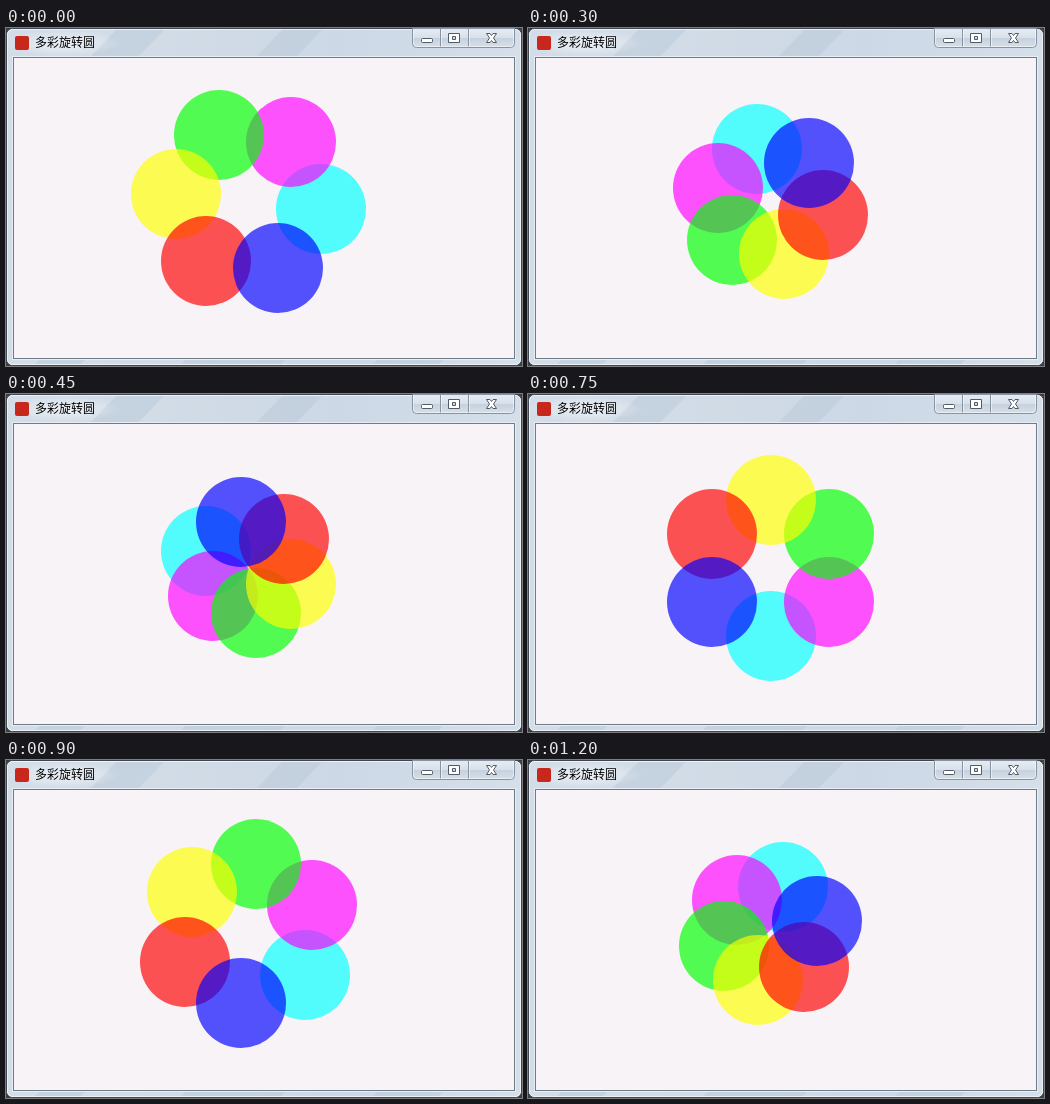
These frames come from a looping animation (516 by 338 pixels, 1350 ms). An HTML page:

```html
<!DOCTYPE html>
<html lang="zh-CN">
<head>
<meta charset="utf-8">
<title>多彩旋转圆</title>
<style>
  html, body { margin: 0; width: 100%; height: 100%; overflow: hidden; background: #3b3f44; }
  svg { display: block; }
</style>
</head>
<body>
<svg width="516" height="338" viewBox="0 0 516 338">
  <defs>
    <linearGradient id="frame" x1="0" y1="0" x2="1" y2="0">
      <stop offset="0" stop-color="#d3dde8"/>
      <stop offset=".3" stop-color="#d2dce7"/>
      <stop offset=".65" stop-color="#ccd8e6"/>
      <stop offset="1" stop-color="#d5dfea"/>
    </linearGradient>
    <linearGradient id="button" x1="0" y1="0" x2="0" y2="1">
      <stop offset="0" stop-color="#e6ecf3"/>
      <stop offset=".48" stop-color="#d8e1eb"/>
      <stop offset=".5" stop-color="#c6d1de"/>
      <stop offset="1" stop-color="#d6e0ea"/>
    </linearGradient>
    <radialGradient id="glow">
      <stop offset="0" stop-color="#fff" stop-opacity=".6"/>
      <stop offset="1" stop-color="#fff" stop-opacity="0"/>
    </radialGradient>
  </defs>

  <!-- Window frame -->
  <rect x=".5" y=".5" width="515" height="337" rx="6" fill="url(#frame)" stroke="#3f464e"/>
  <g fill="#bccad9" opacity=".55">
    <path d="M110 2h48l-26 27h-48zM276 2h40l-26 27h-40z"/>
    <path d="M34 331h46l-5 5H29zM180 331h100l-5 5H175zM372 331h66l-5 5h-66z"/>
  </g>
  <ellipse cx="58" cy="15" rx="58" ry="13" fill="url(#glow)"/>
  <rect x="1.5" y="1.5" width="513" height="335" rx="5" fill="none" stroke="#f3f7fb" stroke-opacity=".85"/>
  <rect x="6.5" y="28.5" width="503" height="303" fill="none" stroke="#e7eef5"/>
  <rect x="7.5" y="29.5" width="501" height="301" fill="#f7f3f7" stroke="#6f7b87"/>

  <!-- Title -->
  <rect x="9" y="8" width="14" height="14" rx="2" fill="#c8281c"/>
  <text x="29" y="19" font-size="12" fill="#000"
        font-family="'Noto Sans CJK SC', 'Noto Sans CJK', sans-serif">多彩旋转圆</text>

  <!-- Window buttons -->
  <path d="M406.5 .5V15.500q0 4 4 4H504.500q4 0 4-4V.5z" fill="url(#button)" stroke="#8793a1"/>
  <path d="M434.500 1V19M462.500 1V19" stroke="#8793a1"/>
  <path d="M407.500 1V15.500q0 3 3 3H504.500q3 0 3-3V1M435.500 1V18M463.500 1V18"
        fill="none" stroke="#fff" stroke-opacity=".5"/>
  <g fill="#fff" stroke="#535b68">
    <rect x="415.500" y="10.500" width="11" height="4" rx="1"/>
    <path fill-rule="evenodd" d="M442.500 5.500h11v9h-11zM446.500 8.500h3v3h-3z"/>
    <path d="M480.500 5.500h3.500l1.500 2 1.500-2h3.500l-3 4.500 3 4.500h-3.500l-1.500-2-1.500 2h-3.500l3-4.500z"/>
  </g>

  <g id="ring" fill-opacity=".667"></g>
</svg>
<script>
  const LOOP = 1350, STEP = 150;
  const CENTER = { x: 243, y: 174 };
  const NEAR = 45, FAR = 74;
  const COLORS = ['#0ff', '#f0f', '#0f0', '#ff0', '#f00', '#00f'];

  const ring = document.getElementById('ring');
  const circles = COLORS.map(color => {
    const circle = document.createElementNS('http://www.w3.org/2000/svg', 'circle');
    circle.setAttribute('r', 45);
    circle.setAttribute('fill', color);
    return ring.appendChild(circle);
  });

  // The distance bounces one pixel per tick between FAR and NEAR.
  function distanceAt(tick) {
    const span = FAR - NEAR;
    const phase = (tick - 1 + 2 * span) % (2 * span);
    return NEAR + Math.abs(span - phase);
  }

  function render(time) {
    const step = Math.floor((time % LOOP) / STEP);
    const turn = 66 - 3 * Math.floor(18.375 * step + 0.7);
    const distance = distanceAt(Math.floor(10.625 * step));
    circles.forEach((circle, i) => {
      const angle = (turn + 60 * (5 - i)) * Math.PI / 180;
      circle.setAttribute('cx', Math.floor(CENTER.x + distance * Math.cos(angle)));
      circle.setAttribute('cy', Math.floor(CENTER.y + distance * Math.sin(angle)));
    });
  }

  const start = performance.now();
  function tick() {
    render(performance.now() - start);
    requestAnimationFrame(tick);
  }
  tick();
</script>
</body>
</html>
```
